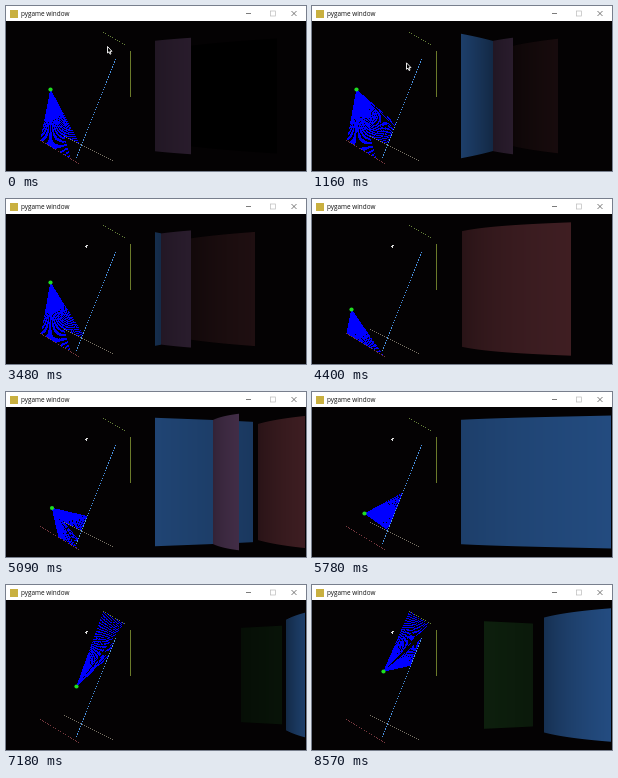
An HTML page with a canvas that plays this animation: 300 px wide and 165 px high, repeating every 9.58 s.

```html
<!DOCTYPE html>
<html>
<head>
<meta charset="utf-8">
<title>pygame window</title>
<style>
html, body { margin: 0; width: 300px; height: 165px; overflow: hidden; background: #000; }
canvas { position: absolute; left: 0; top: 0; }
#title { position: absolute; left: 15px; top: 3px; font: 6.4px/9px "Open Sans", sans-serif; color: #111; white-space: nowrap; }
</style>
</head>
<body>
<canvas id="stage" width="300" height="165"></canvas>
<span id="title">pygame window</span>
<script>
const ctx = document.getElementById('stage').getContext('2d');
const LOOP = 9580, RAD = Math.PI / 180;
const VIEW_X = 149, VIEW_W = 150, MID_Y = 90;

// Ends, colour on the map, colour in the 3D view
const walls = [
  { p: [109, 53, 70, 151], line: '#4a94e4', rgb: [47, 101, 171] },
  { p: [124, 45, 124, 90], line: '#6b7a2a', rgb: [90, 100, 36] },
  { p: [97, 26, 118, 38], line: '#66803a', rgb: [36, 86, 36] },
  { p: [58, 130, 106, 154], line: '#7c7668', rgb: [82, 56, 88] },
  { p: [34, 134, 72, 157], line: '#7a3a40', rgb: [84, 40, 46], red: true }
];

// step, x, y, heading, field of view, mouse x, mouse y
const keys = [
  [0, 44, 83, 86, 48, 101, 40],
  [3, 44, 83, 90, 180, 80, 89],
  [4, 44, 83, 90, 150, 77, 78],
  [7, 44, 83, 90.3, 64.4, 80, 45],
  [8, 44, 83, 90.3, 64.4, 80, 45],
  [12, 39, 110, 86.6, 64.4, 80, 45],
  [18, 52, 121, 4, 64.4, 80, 45],
  [24, 70, 101, -74.9, 64.4, 80, 45],
  [30, 71, 86, -44.3, 64.4, 80, 45]
];

function stepAt(t) {
  if (t < 1160) return 0;
  if (t < 3480) return Math.min(7, 1 + Math.floor((t - 1160) / 230));
  if (t < 6930) return 8 + Math.floor((t - 3480) / 230);
  return Math.min(30, 23 + Math.floor((t - 6930) / 234));
}

function poseAt(step) {
  let i = 0;
  while (i < keys.length - 2 && keys[i + 1][0] <= step) i++;
  const a = keys[i], b = keys[i + 1];
  const f = (step - a[0]) / (b[0] - a[0]);
  return a.map((v, j) => v + (b[j] - v) * f).slice(1);
}

function cast(x, y, angle) {
  const dx = Math.cos(angle * RAD), dy = Math.sin(angle * RAD);
  let hit = null;
  for (const wall of walls) {
    const [x1, y1, x2, y2] = wall.p;
    const ex = x2 - x1, ey = y2 - y1, px = x1 - x, py = y1 - y;
    const det = dx * ey - dy * ex;
    const d = (px * ey - py * ex) / det;
    const u = (px * dy - py * dx) / det;
    if (d > 0 && u >= 0 && u <= 1 && (!hit || d < hit.d)) hit = { d, wall, dx, dy };
  }
  return hit;
}

// A hard line on a grid twice as fine, of which every second pixel is kept
function thinLine(color, x1, y1, x2, y2) {
  ctx.fillStyle = color;
  const n = Math.ceil(2 * Math.max(Math.abs(x2 - x1), Math.abs(y2 - y1)));
  for (let i = 0; i <= n; i++) {
    const x = Math.round(2 * (x1 + (x2 - x1) * i / n));
    const y = Math.round(2 * (y1 + (y2 - y1) * i / n));
    if (x % 2 === 0 && y % 2 === 0) ctx.fillRect(x / 2, y / 2, 1, 1);
  }
}

function drawMap(x, y, heading, fov) {
  for (let a = -fov / 2; a <= fov / 2; a++) {
    const hit = cast(x, y, heading + a);
    if (hit) thinLine('#00f', x, y, x + hit.dx * hit.d, y + hit.dy * hit.d);
  }
  for (const { p, line } of walls) thinLine(line, ...p);
  ctx.fillStyle = '#1fdc1f';
  ctx.beginPath();
  ctx.arc(x + .5, y + .5, 2.1, 0, 7);
  ctx.fill();
}

function drawView(x, y, heading, fov, step) {
  const redLight = step < 1 ? 0 : step < 6 ? .6 : step < 9 ? .8 : 1;
  for (let i = 0; i < VIEW_W; i++) {
    const a = ((i + .5) / VIEW_W - .5) * fov;
    const hit = cast(x, y, heading + a);
    if (!hit) continue;
    const d = hit.d * Math.cos(a * RAD);
    const h = Math.max(0, 150 - .7 * d);
    const light = Math.max(0, 1 - d / 95) * (hit.wall.red ? redLight : 1);
    ctx.fillStyle = `rgb(${hit.wall.rgb.map(c => Math.round(c * light))})`;
    ctx.fillRect(VIEW_X + i, MID_Y - h / 2, 1, h);
  }
}

function drawCursor(x, y, step) {
  if (step >= 7) {
    ctx.fillStyle = '#ddd';
    ctx.fillRect(80, 46, 2, 1);
    ctx.fillRect(79, 47, 2, 1);
    ctx.fillRect(80, 48, 1, 1);
    return;
  }
  const arrow = new Path2D('M.5 .5V7L2 5.8L3 8.2L4 7.8L3 5.3H5Z');
  ctx.save();
  ctx.translate(x, y);
  ctx.fillStyle = '#000';
  ctx.fill(arrow);
  ctx.strokeStyle = '#fff';
  ctx.lineWidth = .9;
  ctx.stroke(arrow);
  ctx.restore();
}

function stroke(x1, y1, x2, y2) {
  ctx.beginPath();
  ctx.moveTo(x1, y1);
  ctx.lineTo(x2, y2);
  ctx.stroke();
}

function drawBar() {
  ctx.fillStyle = '#fff';
  ctx.fillRect(0, 0, 300, 15);
  ctx.fillStyle = '#c9b040';
  ctx.fillRect(4, 4, 8, 8);
  ctx.lineWidth = .7;
  ctx.strokeStyle = '#444';
  stroke(240, 7.5, 245, 7.5);
  stroke(285.5, 5, 290.5, 10);
  stroke(290.5, 5, 285.5, 10);
  ctx.strokeStyle = '#bbb';
  ctx.strokeRect(264.5, 5, 5, 5);
}

function frame(now) {
  const step = stepAt(now % LOOP);
  const [x, y, heading, fov, mx, my] = poseAt(step);
  ctx.fillStyle = '#040203';
  ctx.fillRect(0, 0, 300, 165);
  drawView(x, y, heading, fov, step);
  drawMap(x, y, heading, fov);
  drawCursor(mx, my, step);
  drawBar();
}

const start = performance.now();
function tick() {
  frame(performance.now() - start);
  requestAnimationFrame(tick);
}
tick();
</script>
</body>
</html>
```
